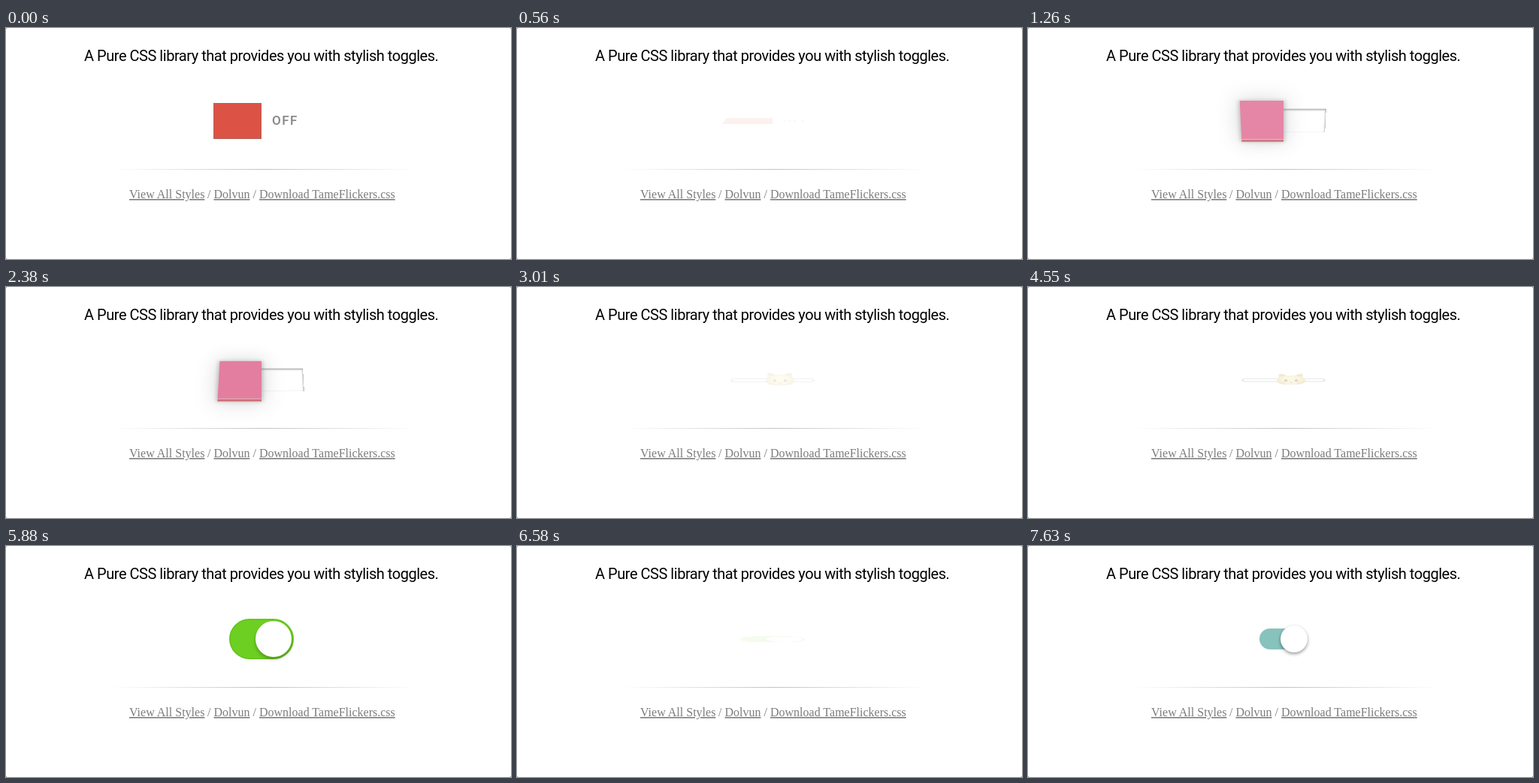
An HTML page that plays this animation: 672 px wide and 308 px high, repeating every 7700 ms.

```html
<!DOCTYPE html>
<html lang="en">
<head>
<meta charset="utf-8">
<title>Stylish toggles</title>
<style>
  html, body { margin: 0; width: 100%; height: 100%; overflow: hidden; background: #8a8a8a; }
  .stage { position: absolute; left: 0; top: 0; width: 672px; height: 308px; overflow: hidden; background: #fff; border-radius: 2px; }
  .stage svg, .toggle { position: absolute; left: 0; top: 0; width: 672px; height: 308px; }
  .toggle { transform-origin: 340px 124px; opacity: 0; }
  .toggle i { position: absolute; box-sizing: border-box; }

  .title { font: 20px Roboto, sans-serif; letter-spacing: -.47px; fill: #000; }
  .links { font: 16px "Liberation Serif", serif; fill: #7c7c7c; }
  .links .a { text-decoration: underline 1px; text-underline-offset: 1px; }
  .rule { position: absolute; left: 138px; top: 188px; width: 410px; height: 1px;
    background: linear-gradient(90deg, transparent, rgba(0, 0, 0, .24), transparent); }

  .page i { left: 276px; top: 100px; width: 64px; height: 48px; background: #dc5345; border: 1px solid #b06259; }
  .page text { font: 500 17px Roboto, sans-serif; letter-spacing: 1.5px; fill: #858585; }

  .block .slot { left: 338px; top: 107px; width: 58px; height: 33px; background: #fff;
    box-shadow: inset -1px 2px 2px rgba(0, 0, 0, .5), inset 0 -1px 1px rgba(0, 0, 0, .08); }
  .block .key { left: 283px; top: 96px; width: 57px; height: 54px; background: #d22c64;
    box-shadow: 0 1px 0 #e08a98, 0 4px 0 #ab1322, 0 2px 5px 2px rgba(0, 0, 0, .32), 0 2px 26px 3px rgba(0, 0, 0, .25); }

  .ios .track { left: 297px; top: 97px; width: 86px; height: 54px; border-radius: 27px; background: #6dcf22; border: 2px solid #66c61f; }
  .ios .knob { left: 332px; top: 100px; width: 48px; height: 48px; border-radius: 50%; background: #fff;
    box-shadow: 0 3px 4px rgba(0, 0, 0, .26); }

  .material .track { left: 308px; top: 110px; width: 62px; height: 28px; border-radius: 14px; background: #87c2bd; }
  .material .knob { left: 336px; top: 106px; width: 36px; height: 36px; border-radius: 50%; background: #fff;
    box-shadow: 0 2px 4px rgba(0, 0, 0, .42); }
</style>
</head>
<body>
<div class="stage">
  <svg viewBox="0 0 672 308">
    <text class="title" x="104" y="44">A Pure CSS library that provides you with stylish toggles.</text>
    <g class="links">
      <text class="a" x="164" y="227">View All Styles</text>
      <text x="268" y="227">/</text>
      <text class="a" x="276.5" y="227">Dolvun</text>
      <text x="328.5" y="227">/</text>
      <text class="a" x="337" y="227">Download TameFlickers.css</text>
    </g>
  </svg>
  <div class="rule"></div>

  <div class="toggle page" data-out="0">
    <i></i>
    <svg viewBox="0 0 672 308"><text x="354" y="129">OFF</text></svg>
  </div>

  <div class="toggle block" data-in="830" data-out="2030">
    <i class="slot"></i><i class="key"></i>
  </div>

  <div class="toggle cat" data-in="2850" data-out="4060">
    <svg viewBox="0 0 672 308">
      <defs>
        <radialGradient id="fur" cx=".5" cy=".5" r=".56">
          <stop offset="0" stop-color="#f6e075"/>
          <stop offset=".55" stop-color="#e6c548"/>
          <stop offset="1" stop-color="#b98a26"/>
        </radialGradient>
      </defs>
      <rect x="285.5" y="119.5" width="109" height="10" rx="4.500" fill="#fff" stroke="#868686" stroke-width="3"/>
      <path fill="url(#fur)" d="M334.500 99C338 99.500 342 103 345 106.500Q350 105.500 355 106.500C358 103 362 99.500 365.500 99
        C367.500 104 367 110 366.500 114C368.500 119 369 123 369 127C369 136 361 141.500 350 141.500
        S331 136 331 127C331 123 331.500 119 333.500 114C333 110 332.500 104 334.500 99Z"/>
      <path fill="#a9782c" d="M336 102Q340 104 342.500 107.500Q338 109 336 112Q335 107 336 102ZM364 102Q360 104 357.500 107.500Q362 109 364 112Q365 107 364 102Z"/>
      <ellipse cx="350" cy="136" rx="6.500" ry="4" fill="#f3e195"/>
      <g fill="#33260f">
        <ellipse cx="343" cy="126" rx="2.200" ry="4.200"/>
        <ellipse cx="357" cy="126" rx="2.200" ry="4.200"/>
      </g>
      <g fill="#fff"><circle cx="343.400" cy="124" r=".7"/><circle cx="357.400" cy="124" r=".7"/></g>
      <path fill="#8f6a45" d="M347.500 132.500H352.500L350 135.500Z"/>
      <path fill="none" stroke="#6f501f" stroke-width="1.200" d="M345.500 136.500Q348 139 350 136.500Q352 139 354.500 136.500"/>
      <path fill="none" stroke="#a88232" stroke-width=".7" d="M341 134L333.500 133M341 136L334.500 138M359 134L366.500 133M359 136L365.500 138"/>
    </svg>
  </div>

  <div class="toggle ios" data-in="4880" data-out="6010">
    <i class="track"></i><i class="knob"></i>
  </div>

  <div class="toggle material" data-in="6850">
    <i class="track"></i><i class="knob"></i>
  </div>
</div>
<script>
  const LOOP = 7700;

  const key = (ms, deg, opacity, easing = 'ease') => ({
    offset: ms / LOOP,
    transform: `perspective(400px) rotateX(${deg}deg)`,
    easing,
    ...(opacity === undefined ? {} : { opacity })
  });

  const flipIn = t => [
    key(t, 90, 0, 'ease-in'),
    key(t + 400, -20, undefined, 'ease-in'),
    key(t + 600, 10, 1),
    key(t + 800, -5, 1),
    key(t + 1000, 0, 1)
  ];

  const flipOut = t => [key(t, 0, 1), key(t + 225, -20, 1), key(t + 750, 90, 0)];

  for (const el of document.querySelectorAll('.toggle')) {
    const { in: start, out: end } = el.dataset;
    const keys = [
      ...(start ? flipIn(+start) : []),
      ...(end ? flipOut(+end) : [])
    ].filter(k => k.offset <= 1);
    // Hold the outer poses up to both ends of the loop.
    const first = { ...keys[0], offset: 0 };
    const last = { ...keys[keys.length - 1], offset: 1 };
    el.animate([first, ...keys, last], { duration: LOOP, iterations: Infinity });
  }
</script>
</body>
</html>
```
